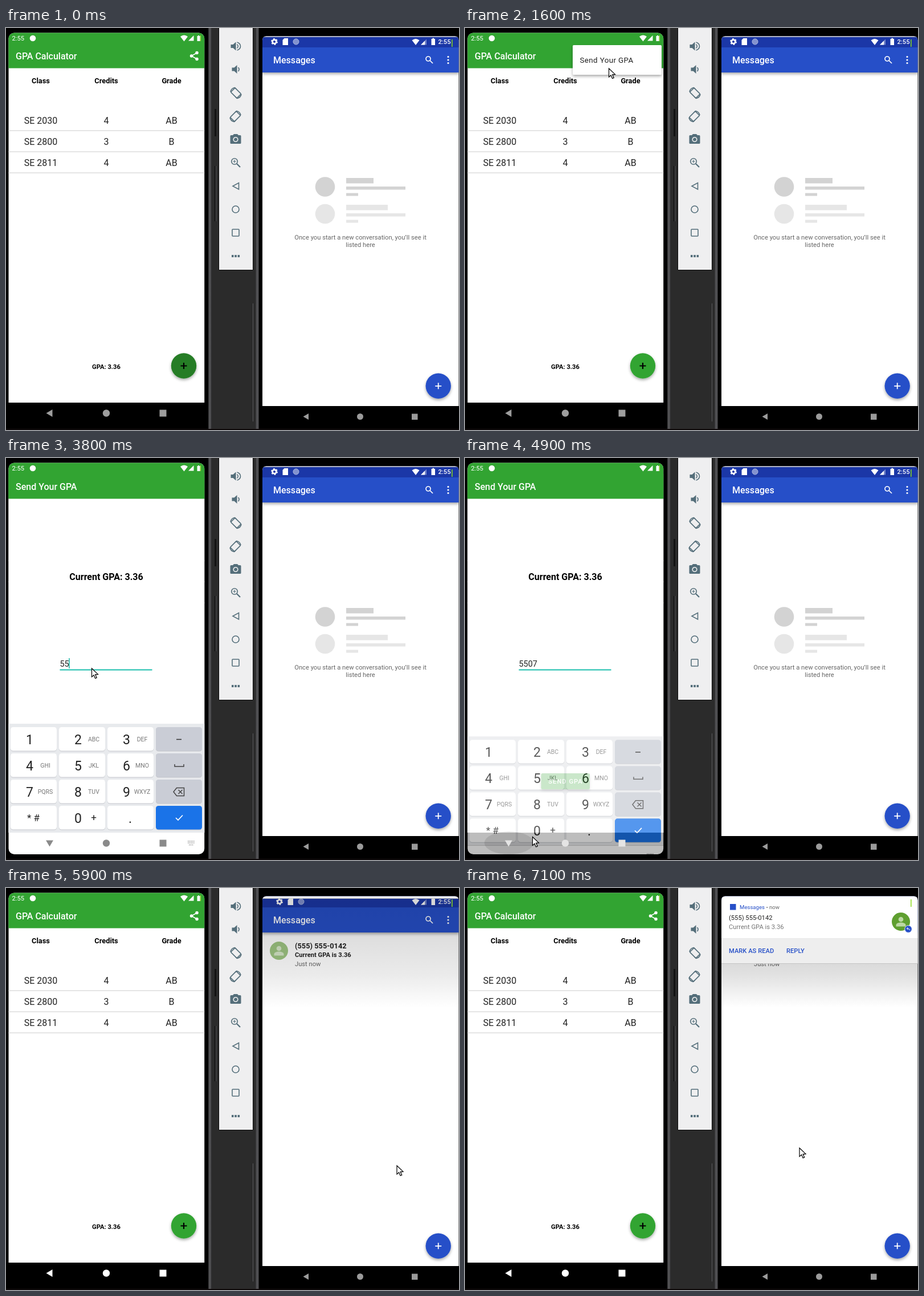
An HTML page for the animation above (7200 ms loop, 795 by 705 pixels).

```html
<!DOCTYPE html>
<html lang="en">
<head>
<meta charset="utf-8">
<title>Send your GPA</title>
<style>
html, body { margin: 0; width: 100%; height: 100%; overflow: hidden; background: #000; }
svg { display: block; width: 795px; height: 705px; font-family: Roboto, sans-serif; }
.mid { text-anchor: middle; }
.med { font-weight: 500; }
.bold { font-weight: 700; }
.tools { fill: none; stroke: #546e7a; stroke-width: 1.6; }
.solid { fill: #546e7a; stroke: none; }
</style>
</head>
<body>
<svg viewBox="0 0 795 705">
  <defs>
    <clipPath id="leftClip"><rect x="4.500" y="8.500" width="343.700" height="686.500" rx="10"/></clipPath>
    <clipPath id="rightClip"><path d="M450 663V21.500q0-7 7-7H787.500q7 0 7 7V663z"/></clipPath>
    <linearGradient id="rim"><stop stop-color="#333335"/><stop offset=".5" stop-color="#5c5c5f"/><stop offset="1" stop-color="#2a2a2c"/></linearGradient>
    <linearGradient id="dim" x2="0" y2="1"><stop stop-opacity=".24"/><stop offset=".35" stop-opacity=".2"/><stop offset=".7" stop-opacity=".12"/><stop offset="1" stop-opacity="0"/></linearGradient>
    <filter id="soft" x="-20%" y="-20%" width="140%" height="150%"><feDropShadow dx="0" dy="2.500" stdDeviation="2.500" flood-opacity=".35"/></filter>
    <g id="person"><circle r="16" fill="#5f9f30"/><g fill="#bcd8a4"><circle cy="-4" r="4.300"/><path d="M-8.500 8.500v-2.500c0-6 17-6 17 0v2.500z"/></g></g>
    <path id="wifi" d="M-6.500-3.500Q0-8.500 6.500-3.500L0 5z"/>
    <path id="plus" d="M-5.500 0H5.500M0-5.500V5.500" fill="none"/>
  </defs>

  <!-- frames of the two phones and the tool strip -->
  <path d="M361 0h78v703h-78z" fill="#2b2b2b"/>
  <rect x="355" width="6" height="703" fill="url(#rim)"/>
  <path d="M367.500 142v48M367.500 242v97" stroke="#131313" stroke-width="3"/>
  <path d="M368.500 242v97M433.500 483v207" stroke="#5a5a5c"/>
  <path d="M0 703.500h795" stroke="#1a1012"/>
  <path d="M373.500-1h60v425.500h-60z" fill="#efeff0" stroke="#080808"/>
  <g class="tools">
    <g transform="translate(403 32)"><path class="solid" d="M-8.500-3h4l5-4.500v15l-5-4.500h-4z"/><path d="M2.500-3.500q3.500 3.500 0 7M2.500-7c8 2.500 8 11.500 0 14"/></g>
    <g transform="translate(403 72.500)"><path class="solid" d="M-6.500-3h4l5-4.500v15l-5-4.500h-4z"/><path d="M4.500-3.500q3 3.500 0 7"/></g>
    <g id="turn" transform="translate(403.500 114)"><rect x="-5.300" y="-7.500" width="10.600" height="15" rx="1" transform="rotate(-45)"/><path d="M-9.500-2A9.500 9.500 0 0 1-2-9.500l2.500 2.500M9.500 2A9.500 9.500 0 0 1 2 9.500l-2.500-2.500"/></g>
    <use href="#turn" transform="translate(806 41) scale(-1 1)"/>
    <g transform="translate(403 195)"><path class="solid" d="M-9.500-5.500q0-1.500 1.500-1.500h3l2-2h6l2 2h3q1.500 0 1.500 1.500v12q0 1.500-1.500 1.500h-16q-1.500 0-1.500-1.500z"/><circle r="3.800" cy=".5" stroke="#efeff0"/></g>
    <g transform="translate(401 234)"><circle r="5.300"/><path d="M4 4l6 6" stroke-width="2.200"/><path d="M-2.600 0h5.200M0-2.600v5.200" stroke-width="1.200"/></g>
    <path d="M408.500 271.500v11.500l-10.500-5.700z"/>
    <circle cx="403" cy="318" r="6"/>
    <rect x="397" y="353" width="12" height="12" rx="1"/>
    <path class="solid" d="M396 398h3.500v4h-3.500zM401.300 398h3.500v4h-3.500zM406.600 398h3.500v4h-3.500z"/>
  </g>

  <!-- left phone -->
  <g clip-path="url(#leftClip)">
    <path d="M0 8h350v649H0z" fill="#fff"/>
    <path d="M0 8h350v62.500H0z" fill="#32a432"/>
    <g id="home">
      <text class="med" x="17" y="55" font-size="16" fill="#fff">GPA Calculator</text>
      <g fill="#fff" stroke="#fff" stroke-width="1.500"><path d="M335 43.500l-9.500 5.500 9.500 5.500" fill="none"/><circle cx="335" cy="43.500" r="2"/><circle cx="325.500" cy="49" r="2"/><circle cx="335" cy="54.500" r="2"/></g>
      <g id="grades"></g>
      <text class="mid bold" x="176" y="597.500" font-size="11.200">GPA: 3.36</text>
      <circle cx="312" cy="592.500" r="22.200" fill="#32a432" filter="url(#soft)"/>
      <circle id="press" cx="312" cy="592.500" r="22.200"/>
      <use href="#plus" x="312" y="592.500" stroke="#000" stroke-width="2.200"/>
      <g id="menu">
        <rect x="189" y="30" width="156" height="52" rx="2" fill="#fff" filter="url(#soft)"/>
        <text x="201.500" y="61" font-size="13.400" letter-spacing=".37" fill="#222">Send Your GPA</text>
      </g>
    </g>
    <g id="send">
      <path d="M0 71.500h350V657H0z" fill="#fff"/>
      <path d="M0 28h350v43.500H0z" fill="#32a432"/>
      <text class="med" x="17" y="55.500" font-size="16" fill="#fff">Send Your GPA</text>
      <text class="mid bold" x="176" y="213.500" font-size="16">Current GPA: 3.36</text>
      <path id="line" d="M94.500 371.500h162"/>
      <text id="entry" x="94.500" y="365.500" font-size="14.400" fill="#222"></text>
      <path id="caret" stroke="#12b5a5" stroke-width="1.500" d="M0 351v18"/>
      <rect x="133.500" y="553" width="85.500" height="28" rx="2.500" fill="#32a432" filter="url(#soft)"/>
      <text class="mid med" x="176.500" y="571" font-size="11.200" letter-spacing="1" fill="#fff">SEND GPA</text>
    </g>
    <g fill="#fff">
      <text x="10.500" y="22" font-size="11.200">2:55</text>
      <circle cx="47" cy="18" r="5.300"/>
      <use href="#wifi" x="312.500" y="18.500"/>
      <path d="M320 22.500h9.500v-9.500zM335.500 14h1.500v-1h2v1h1.500v9h-5z"/>
      <path d="M341.500 13v10" stroke="#a6d92a"/>
    </g>
    <path d="M0 657h350v40H0z"/>
    <g id="keyboard">
      <path d="M0 466h350v191H0z" fill="#e8eaed"/>
      <path d="M0 657h350v100H0z" fill="#fff"/>
      <g id="keys"></g>
      <path d="M299 493.500h9" stroke="#333" stroke-width="1.700"/>
      <path d="M296 537v4h16v-4M294 585.500l5.500-7h13v14h-13zM302.500 582l7 7m0-7l-7 7" fill="none" stroke="#444" stroke-width="1.500"/>
      <path d="M298 631l4 4 8-8.500" fill="none" stroke="#fff" stroke-width="1.700"/>
      <path d="M319 672h12M319 675h12M321 678.500h8" stroke="#999" stroke-width="1.600" stroke-dasharray="1.500 1"/>
    </g>
    <ellipse id="ripple" cx="77" cy="675" rx="43" ry="20"/>
    <g id="nav"><path id="back" d="M70.500 675.500l11-6.500v13z"/><circle cx="176" cy="675.500" r="6.200"/><path d="M269.500 669.500h12v12h-12z"/></g>
  </g>

  <!-- right phone -->
  <path d="M444 0h351v703H444z"/>
  <rect x="438" width="6" height="703" fill="url(#rim)"/>
  <g clip-path="url(#rightClip)">
    <path d="M449 14h346v649H449z" fill="#fff"/>
    <g id="empty">
      <g fill="#d3d3d3"><circle cx="560" cy="278.500" r="17.300"/><path d="M597 263h48v9.500h-48zM597 278h104v5.500H597zM597 289.500h21v5h-21z"/></g>
      <g fill="#e6e6e6"><circle cx="560" cy="326" r="17.300"/><path d="M597 310h73v9.500h-73zM597 325h104v5.500H597zM597 336.500h21v5h-21z"/></g>
      <g class="mid" font-size="11.200" fill="#666"><text x="622" y="371">Once you start a new conversation, you’ll see it</text><text x="622" y="384">listed here</text></g>
    </g>
    <g id="chat">
      <use id="face" href="#person" x="479" y="110"/>
      <text class="bold" x="507" y="106" font-size="12.800" fill="#222">(555) 555-0142</text>
      <text class="bold" x="507" y="121" font-size="11.200" fill="#222">Current GPA is 3.36</text>
      <text x="507" y="136.500" font-size="11.200" fill="#666">Just now</text>
    </g>
    <path d="M449 34h346v44H449z" fill="#2750c8" filter="url(#soft)"/>
    <path d="M449 14h346v20H449z" fill="#1b37a7"/>
    <text class="med" x="469" y="62" font-size="16" fill="#fff">Messages</text>
    <g fill="none" stroke="#fff" stroke-width="1.700"><circle cx="741" cy="54" r="4"/><path d="M744 57l5 5"/></g>
    <path d="M776 50.500v12" stroke="#fff" stroke-width="3.200" stroke-linecap="round" stroke-dasharray="0 5.500"/>
    <g id="icons" fill="#fff">
      <circle cx="471" cy="24" r="3.400" fill="none" stroke="#fff" stroke-width="2.600"/>
      <circle cx="471" cy="24" r="5" fill="none" stroke="#fff" stroke-width="1.800" stroke-dasharray="2.620"/>
      <path d="M485.500 21l3-3h6.500v12h-9.500z"/>
      <circle cx="509" cy="24" r="5" fill="#8292cf" stroke="#a9b5df"/>
    </g>
    <g fill="#fff">
      <use href="#wifi" x="719" y="25"/>
      <path d="M728 29.500h10V19.500z" opacity=".4"/><path d="M728 29.500h7v-7zM746.500 19h2v-1.300h2.500v1.300h2v11h-6.500z"/>
      <text class="med" x="758.500" y="28" font-size="11.200">2:55</text>
    </g>
    <path id="shade" d="M449 14h346v196H449z" fill="url(#dim)"/>
    <g id="alert">
      <path d="M449 14h346v74.500H449z" fill="#fff"/>
      <path d="M449 88.500h346v44H449z" fill="#eee"/>
      <path d="M449 132.500h346" stroke="#c4c4c4"/>
      <rect x="465" y="28" width="10.500" height="10.500" fill="#2750c8"/>
      <text x="482" y="37" font-size="9.600" fill="#2750c8">Messages <tspan fill="#666">• now</tspan></text>
      <text x="463" y="56" font-size="11.200" fill="#222">(555) 555-0142</text>
      <text x="463" y="72" font-size="11.200" fill="#757575">Current GPA is 3.36</text>
      <use href="#person" x="765" y="59"/>
      <circle cx="778" cy="72" r="6.300" fill="#2750c8" stroke="#fff" stroke-width=".8"/>
      <path d="M781 74q-1-3-5.500-3l1.800-2m-1.800 2l1.800 2" fill="none" stroke="#fff"/>
      <g class="med" font-size="11.200" fill="#2750c8"><text x="463" y="114">MARK AS READ</text><text x="564" y="114">REPLY</text></g>
    </g>
    <circle cx="758.700" cy="627.800" r="22.200" fill="#2750c8" filter="url(#soft)"/>
    <use href="#plus" x="758.700" y="627.800" stroke="#fff" stroke-width="1.800"/>
    <path d="M782.800 20v13" stroke="#8bdc1c" stroke-width="1.500"/>
  </g>
  <g fill="#9b9b9b"><path d="M521.500 681.500l9.500-5.500v11z"/><circle cx="621.500" cy="681.500" r="5.500"/><path d="M712 676.500h10.500v10.500h-10.500z"/></g>

  <path id="cursor" d="M0 0v15l3.600-3.200 2.500 5.700 2.600-1.100-2.500-5.600 4.800-.4z" fill="#fff" stroke="#000" stroke-width="1.200"/>
</svg>
<script>
const $ = id => document.getElementById(id);
const LOOP = 7200, STEP = 100, NUMBER = "5507";

const columns = [61, 176, 290.5];
const row = (cells, y, attrs) => cells.map((s, i) =>
  `<text class="mid ${attrs}" x="${columns[i]}" y="${y}">${s}</text>`).join("");
const classes = [["SE 2030", 4, "AB"], ["SE 2800", 3, "B"], ["SE 2811", 4, "AB"]];
$("grades").innerHTML = `<g font-size="12.8">${row(["Class", "Credits", "Grade"], 97, "bold")}</g>` +
  `<g font-size="16" fill="#222">${classes.map((c, i) => row(c, 168 + 37 * i, "") +
    `<path d="M4 ${180 + 37 * i}h345" stroke="#dcdcdc" stroke-width="1.3"/>`).join("")}</g>`;

const labels = ["1", "2 ABC", "3 DEF", "", "4 GHI", "5 JKL", "6 MNO", "", "7 PQRS", "8 TUV", "9 WXYZ", "", "* #", "0 +", ".", ""];
$("keys").innerHTML = labels.map((label, i) => {
  const x = 8 + 85 * (i % 4), y = 472 + 46 * (i >> 2);
  const fill = i === 15 ? "#1a73e8" : i % 4 === 3 ? "#cacdd6" : "#fff";
  const [big, small = ""] = i === 12 ? ["", ""] : label.split(" ");
  return `<rect x="${x}" y="${y + 1}" width="81" height="41.500" rx="4.500" fill="#c3c6cb"/>
    <rect x="${x}" y="${y}" width="81" height="41.500" rx="4.500" fill="${fill}"/>
    <text class="mid" x="${x + (i === 14 ? 40 : 33.5)}" y="${y + 29.5}" font-size="23" fill="#222">${big}</text>
    <text class="mid" x="${x + 61}" y="${y + (i === 13 ? 26 : 25)}" font-size="${i === 13 ? 17 : 10.5}" fill="${i === 13 ? "#222" : "#777"}">${small}</text>` +
    (i === 12 ? `<text class="mid" x="48" y="${y + 27}" font-size="17" fill="#222">* #</text>` : "");
}).join("");

// time, x, y of the pointer tip
const path = [
  [200, 312, 590], [900, 330, 50], [1200, 328, 52], [1600, 252.5, 71], [1900, 252.5, 71],
  [2500, 158, 612], [2900, 150.5, 369], [4300, 150.5, 369], [4700, 78, 672], [4900, 118.5, 664.5],
  [5200, 176, 566], [5400, 176, 566], [5900, 686, 487], [6200, 686, 487], [6900, 587, 456], [LOOP, 587, 456]
];
const ramp = (t, a, b) => Math.min(1, Math.max(0, (t - a) / (b - a)));
const smooth = u => u * u * (3 - 2 * u);
const set = (id, name, v) => $(id).setAttribute(name, v);
const fade = (id, v) => set(id, "opacity", v);

function pointer(t) {
  const i = Math.max(1, path.findIndex(p => p[0] > t));
  const [a, x, y] = path[i - 1], [b, x2, y2] = path[i];
  const u = smooth(ramp(t, a, b));
  return `translate(${x + (x2 - x) * u} ${y + (y2 - y) * u})`;
}

function draw(t) {
  fade("press", 0.24 * (1 - ramp(t, 0, 400)));
  fade("menu", t < 1800 ? ramp(t, 1100, 1300) : 0);
  fade("send", ramp(t, 1600, 1800) - ramp(t, 5300, 5600));

  const focused = t >= 2900;
  set("line", "stroke", focused ? "#1cbfae" : "#777");
  set("line", "stroke-width", focused ? 2 : 1);
  const typed = [3400, 3600, 4000, 4200].filter(at => t >= at).length;
  $("entry").textContent = NUMBER.slice(0, typed);
  set("caret", "transform", `translate(${94.8 + 8.08 * typed} 0)`);
  fade("caret", focused && t < 4700 && Math.floor((t - 2800) / 500) % 2 === 0 ? 1 : 0);

  const up = ramp(t, 2900, 3200) - ramp(t, 4800, 5100);
  fade("keyboard", smooth(up));
  set("keyboard", "transform", `translate(0 ${(1 - up) * 67})`);
  set("nav", "fill", t < 2900 ? "#9e9e9e" : t < 4800 ? "#8a8a8a" : t < 5100 ? "#e4e4e4" : "#fff");
  set("back", "transform", up > 0.4 ? "rotate(-90 76.5 675.5)" : "");
  fade("ripple", t >= 4700 && t < 5100 ? 0.1 : 0);

  fade("empty", t < 5700 ? 1 : 0);
  fade("chat", t < 5700 ? 0 : 1);
  fade("face", ramp(t, 5600, 6100));
  fade("shade", ramp(t, 5700, 6000));
  set("icons", "transform", `translate(${9 * ramp(t, 5800, 5900)} 0)`);
  const drop = smooth(ramp(t, 5860, 6300));
  set("alert", "transform", `translate(0 ${-117 * (1 - drop)})`);

  fade("cursor", t < 200 ? 0 : 1);
  set("cursor", "transform", pointer(t));
}

function tick() {
  draw(Math.floor(performance.now() % LOOP / STEP) * STEP);
  requestAnimationFrame(tick);
}
tick();
</script>
</body>
</html>
```
